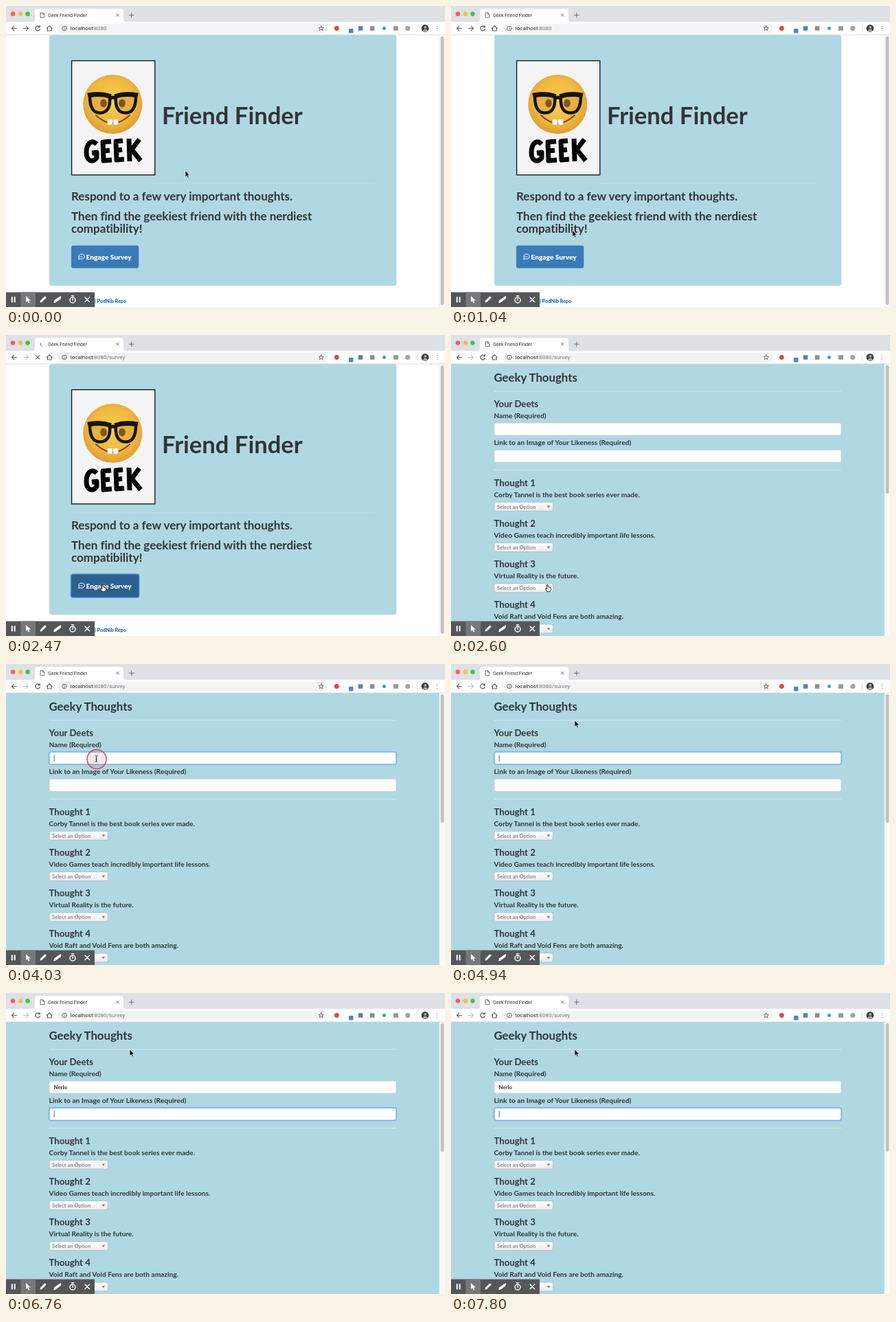
An HTML page that plays this animation: 639x438 px, repeating every 8 s.

```html
<!DOCTYPE html>
<html lang="en">
<head>
<meta charset="utf-8">
<title>Geek Friend Finder</title>
<style>
html, body { margin: 0; width: 100%; height: 100%; overflow: hidden; background: #fff; }
svg { display: block; width: 639px; height: 438px; }
text { font-family: Lato, "Open Sans", sans-serif; font-weight: 700; font-variant-ligatures: none; fill: #333438; white-space: pre; }
.heavy { font-weight: 900; }
.ui { font-family: Roboto, Arial, sans-serif; font-weight: 400; fill: #333; }
.line { fill: none; stroke: #5f6368; stroke-width: 1.2; stroke-linecap: round; stroke-linejoin: round; }
.thin { stroke-width: .9; }
.white { fill: none; stroke: #fff; stroke-width: 1.5; stroke-linecap: round; stroke-linejoin: round; }
.field { fill: #fff; stroke: #c3cdd1; stroke-width: .8; }
.glow rect { fill: none; stroke: #66afe9; }
</style>
</head>
<body>
<svg viewBox="0 0 639 438">
  <defs>
    <radialGradient id="skin" cx=".5" cy=".45" r=".58">
      <stop offset="0" stop-color="#f8cf52"/>
      <stop offset=".65" stop-color="#f0b941"/>
      <stop offset="1" stop-color="#dd9732"/>
    </radialGradient>
    <linearGradient id="soft" x2="0" y2="1">
      <stop offset="0" stop-color="#fff"/>
      <stop offset="1" stop-color="#e9ebec"/>
    </linearGradient>
    <g id="rim">
      <path d="M122 131Q136 128 151 132Q153 155 137 155.500Q122 156 122 131Z" fill="#e0a63c" fill-opacity=".6" stroke="#141414" stroke-width="4.500"/>
      <path d="M119 129.500Q136 125.500 153 131" fill="none" stroke="#141414" stroke-width="5.500"/>
      <ellipse cx="142" cy="141.500" rx="4.800" ry="6" fill="#855222"/>
    </g>
  </defs>

  <g id="home">
    <rect y="42" width="639" height="396" fill="#fff"/>
    <rect x="63" y="42" width="505.300" height="365" rx="4" fill="#b0d8e2"/>
    <rect x="95.600" y="79.600" width="121.200" height="166.200" fill="#f4f4f5" stroke="#111" stroke-width="1.300"/>
    <circle cx="155.300" cy="143" r="43" fill="url(#skin)"/>
    <use href="#rim"/>
    <use href="#rim" transform="translate(311 0) scale(-1 1)"/>
    <path d="M151 135Q155.500 131 160 135" fill="none" stroke="#141414" stroke-width="5"/>
    <path d="M131 159Q155 182 180 159" fill="none" stroke="#7a4817" stroke-width="2" stroke-linecap="round"/>
    <path d="M147.500 165h7.500v6q0 2-2 2h-3q-2.500 0-2.500-3zM156 165h7.500v5q0 3-2.500 3h-3q-2 0-2-2z" fill="#fff" stroke="#c9b79a" stroke-width=".5"/>
    <path role="img" aria-label="GEEK" fill="none" stroke="#050505" stroke-width="7" stroke-linejoin="round"
      d="M132 201C123 192 117 203 117 213C117 225 125 229 132 221V213L125 214M153 197L141 198L142 225L154 224M142 211L151 210M170 196L160 197L161 224L172 223M161 210L169 209M179 193L180 226M194 194L183 209L196 225"/>
    <path d="M95 258.500H536" stroke="#b8dce4"/>
    <text x="227" y="172" font-size="34.600">Friend Finder</text>
    <g font-size="17">
      <text x="95" y="283">Respond to a few very important thoughts.</text>
      <text x="95" y="312">Then find the geekiest friend with the nerdiest</text>
      <text x="95" y="330">compatibility!</text>
    </g>
    <rect id="ring" x="94.700" y="348.200" width="98.800" height="33.600" rx="3" fill="none" stroke="#5590ea" stroke-width="2"/>
    <rect id="button" x="95" y="348.500" width="98.200" height="33" rx="3"/>
    <g fill="none" stroke="#fff">
      <path d="M105.500 368.500L106.300 366.300A4.300 3.600 0 1 1 108.200 367.800Z"/>
      <path d="M106.800 364.800h5" stroke-width="1.200" stroke-dasharray="1.100 .8"/>
    </g>
    <text class="heavy" x="116.500" y="369" font-size="10.100" style="fill:#fff">Engage Survey</text>
    <text class="heavy" x="129" y="431.500" font-size="7.200" style="fill:#2f73b0">| PodNib Repo</text>
  </g>

  <g id="survey">
    <rect y="42" width="639" height="396" fill="#b0d8e2"/>
    <path d="M63 82H568M63 196.500H568" stroke="#d6eaef"/>
    <text x="62.500" y="68" font-size="16.800">Geeky Thoughts</text>
    <text x="62.500" y="105" font-size="13.200">Your Deets</text>
    <g font-size="10.250">
      <text x="62.500" y="121">Name (Required)</text>
      <text x="62.500" y="160">Link to an Image of Your Likeness (Required)</text>
    </g>
    <rect class="field" x="63" y="128" width="505" height="18" rx="2.500"/>
    <rect class="field" x="63" y="167.300" width="505" height="18" rx="2.500"/>
    <g id="focus" class="glow">
      <rect x="62.500" y="127.500" width="506" height="19" rx="3" stroke-width="2.200" opacity=".35"/>
      <rect x="63" y="128" width="505" height="18" rx="2.500" stroke-width="1"/>
    </g>
    <text id="name" x="69.500" y="140" font-size="7.800"></text>
    <path id="caret" d="M.5 132.500v9" stroke="#444" stroke-width=".8"/>
    <g id="thoughts"></g>
  </g>

  <g id="scroll">
    <rect x="631" y="42" width="8" height="396" fill="#fafafa"/>
    <path d="M630.800 42V438" stroke="#e6e6e6" stroke-width=".7"/>
    <rect id="thumb" x="632.700" y="44" width="4.800" rx="2.400" fill="#c1c1c1"/>
  </g>

  <rect width="639" height="23.500" fill="#dee1e6"/>
  <rect y="23" width="639" height="19" fill="#fff"/>
  <path d="M0 42H639" stroke="#d5d7da" stroke-width=".8"/>
  <path d="M38 23.500Q42 23.500 42 19.500V8Q42 4 46 4H167Q171 4 171 8V19.500Q171 23.500 175 23.500Z" fill="#fff"/>
  <circle cx="10" cy="11.500" r="3.200" fill="#fc5b57"/>
  <circle cx="21" cy="11.500" r="3.200" fill="#fdbc40"/>
  <circle cx="31.500" cy="11.500" r="3.200" fill="#34c84a"/>
  <path id="page" class="line thin" d="M50.500 9.800h3.200l2 2v5h-5.200zM53.500 10v2h2"/>
  <circle id="spin" cx="53.500" cy="13.200" r="3" fill="none" stroke="#3b78e7" stroke-dasharray="6 13"/>
  <text class="ui" x="61" y="15.800" font-size="6.850">Geek Friend Finder</text>
  <path class="line thin" d="M160.500 11.500l3.600 3.600m0-3.600l-3.600 3.600M179.500 13.300h6.500m-3.250-3.250v6.500"/>
  <path class="line" d="M15.500 32.500H8.500m3.200-3.200L8.500 32.500l3.200 3.200"/>
  <path id="forward" class="line" d="M25.500 32.500h7m-3.200-3.200l3.200 3.200l-3.200 3.200"/>
  <path id="reload" class="line" d="M48.800 30.300A3.400 3.400 0 1 0 49.400 33.500M49.300 28.700v2.300h-2.400"/>
  <path id="stop" class="line" d="M43.300 29.800l5.400 5.400m0-5.400l-5.400 5.400"/>
  <path class="line" d="M59.300 32.500L63.200 28.900L67.100 32.500M60.400 32v4h5.700v-4"/>
  <rect x="75" y="25.800" width="393" height="13.400" rx="6.700" fill="#f1f3f4"/>
  <circle class="line thin" cx="85" cy="32.500" r="3.300"/>
  <path class="line thin" d="M85 32.200v2M85 30.700v.1"/>
  <text class="ui" x="93.700" y="35.300" font-size="8.050">localhost<tspan id="path" fill="#777"></tspan></text>
  <path class="line thin" d="M458.700 28.900l1.050 2.300l2.500.3l-1.850 1.700l.5 2.500l-2.200-1.250l-2.200 1.250l.5-2.500l-1.850-1.700l2.500-.3z"/>
  <circle cx="481.300" cy="32.500" r="3.400" fill="#dc4a42"/>
  <rect x="499" y="33" width="6.500" height="6.500" rx="1" fill="#4a83dc"/>
  <rect x="512.800" y="29.300" width="6.500" height="6.500" fill="#5b80b5"/>
  <rect x="529.800" y="29.300" width="6.500" height="6.500" fill="#8b8f94"/>
  <circle cx="550.500" cy="32.500" r="2.500" fill="#3f9dc9"/>
  <rect x="564" y="29.300" width="7" height="6.500" fill="#96999d"/>
  <circle cx="584.800" cy="32.500" r="3.500" fill="#a0a3a6"/>
  <path d="M598.500 27v11" stroke="#d5d7da" stroke-width=".8"/>
  <circle cx="610" cy="32.500" r="5.400" fill="#3c3e42"/>
  <circle cx="610.300" cy="31" r="1.900" fill="#a8a8a8"/>
  <path d="M606.500 36.500q3.800-6 7.600 0q-3.800 2.500-7.600 0" fill="#a8a8a8"/>
  <path class="line" d="M627.500 29.500v.01M627.500 32.500v.01M627.500 35.500v.01"/>

  <rect y="416.500" width="129" height="21.500" fill="#555658"/>
  <rect x="21.500" y="416.500" width="21.500" height="21.500" fill="#77787a"/>
  <path class="white" style="stroke-width:2" d="M8.800 424v6.500M12.700 424v6.500"/>
  <path d="M29 422v9l2.200-2l1.600 3.500l1.700-.8l-1.600-3.300h3z" fill="#fff"/>
  <path d="M49.500 431.500l.5-2.700l6-6q1-.8 2 .2t.2 2l-6 6z" fill="#fff"/>
  <path d="M70 428.500l8.500-6h2l-1 3.800l-8 5.700h-2.300z" fill="#fff"/>
  <circle class="white" cx="97" cy="428" r="4"/>
  <path class="white" d="M95.500 421.800h3M97 426v2.200"/>
  <path class="white" d="M115 424l6.500 6.500m0-6.500l-6.500 6.500"/>

  <circle id="click" fill="#d8546a" fill-opacity=".12" stroke="#cf4c63" stroke-width="1.500"/>
  <g id="pointer">
    <path id="arrow" d="M0 0V9.500L2.200 7.500L3.800 11L5.300 10.300L3.800 7H6.700Z" fill="#111" stroke="#fff" stroke-width=".6"/>
    <path id="hand" d="M-.9 0Q0-1 .8 0V3.200Q2 2.700 2.300 3.600Q3.500 3.200 3.800 4.200Q5 4 5 5.300V6.500Q5 8 4 9V9.700H-.8Q-1.500 8-3 6.200Q-3.300 4.700-1.900 5.300L-.9 6.200Z" fill="#fff" stroke="#111" stroke-width=".9"/>
    <path id="beam" d="M-1.800-4.500Q0-4.500 0-3.500Q0-4.500 1.800-4.500M0-3.500V3.500M-1.800 4.500Q0 4.500 0 3.500Q0 4.500 1.800 4.500M-.9.8h1.800" fill="none" stroke="#222"/>
  </g>
</svg>
<script>
const LOOP = 8000, STEP = 130;
const LOAD = 2340, OPEN = 2600, FOCUS = 3900, TAB = 6760;
const NAME = "Nerlo";
const keyTimes = [5200, 5460, 5590, 5720, 5850];
const route = [
  [130, 261, 239.5], [1560, 140.5, 363.5], [2860, 140.5, 363.5],
  [3510, 131.5, 138], [4160, 131.5, 138], [4550, 180, 82]
];
const clicks = [[2080, 141, 366], [3900, 132, 138.5]];
const ringSizes = [9, 14, 14, 5];
const thoughts = [
  "Corby Tannel is the best book series ever made.",
  "Video Games teach incredibly important life lessons.",
  "Virtual Reality is the future.",
  "Void Raft and Void Fens are both amazing."
];

const $ = id => document.getElementById(id);
const show = (id, on) => $(id).style.display = on ? "" : "none";
const set = (id, attrs) => {
  for (const key in attrs) $(id).setAttribute(key, attrs[key]);
};

$("thoughts").innerHTML = thoughts.map((line, i) => `
  <g transform="translate(0 ${i * 59.2})">
    <text x="62.5" y="219.5" font-size="13.2">Thought ${i + 1}</text>
    <text x="62.5" y="235.5" font-size="10.15">${line}</text>
    <rect x="63" y="243.3" width="85.5" height="13" rx="2.5" fill="url(#soft)" stroke="#aab8bd" stroke-width=".8"/>
    <text x="67" y="252.5" font-size="7.6" style="fill:#8b8d90">Select an Option</text>
    <path d="M139.300 248.300h5l-2.500 3.500z" fill="#888"/>
  </g>`).join("");

function pointerAt(t) {
  const next = route.findIndex(p => p[0] > t);
  if (next === 0) return route[0].slice(1);
  if (next < 0) return route[route.length - 1].slice(1);
  const [t0, x0, y0] = route[next - 1], [t1, x1, y1] = route[next];
  const u = (t - t0) / (t1 - t0), k = u * u * (3 - 2 * u);
  return [x0 + (x1 - x0) * k, y0 + (y1 - y0) * k];
}

function drawPointer(t, x, y, hover) {
  const inField = (y > 128 && y < 146) || (y > 167 && y < 185);
  const kind = hover || (t >= OPEN && t < 2990) ? "hand"
    : t >= OPEN && inField ? "beam" : "arrow";
  for (const id of ["arrow", "hand", "beam"]) show(id, id === kind);
  set("pointer", { transform: `translate(${x} ${y})` });

  const hit = clicks.find(c => t >= c[0] && t < c[0] + ringSizes.length * STEP);
  show("click", hit);
  if (!hit) return;
  const r = ringSizes[Math.floor((t - hit[0]) / STEP)];
  set("click", { cx: hit[1], cy: hit[2], r, opacity: r / 14 });
}

function drawForm(t) {
  const typed = keyTimes.filter(k => k <= t);
  $("name").textContent = NAME.slice(0, typed.length);
  const second = t >= TAB;
  const since = second ? TAB : typed.length ? typed[typed.length - 1] : FOCUS;
  const width = second || !typed.length ? 0 : $("name").getComputedTextLength();
  const drop = second ? 39.3 : 0;
  show("focus", t >= FOCUS);
  show("caret", t >= FOCUS && (t - since) % 1000 < 515);
  set("focus", { transform: `translate(0 ${drop})` });
  set("caret", { transform: `translate(${69.7 + width} ${drop})` });
}

function draw(t) {
  const opened = t >= OPEN, loading = t >= LOAD && !opened;
  const [x, y] = pointerAt(t);
  const hover = !opened && x > 95 && x < 193 && y > 349 && y < 381;
  show("home", !opened);
  show("survey", opened);
  show("ring", t >= 2210);
  set("button", { fill: hover ? "#2c608f" : "#3a7ab7" });
  set("thumb", { height: opened ? 187 : 391 });
  show("page", !loading);
  show("spin", loading);
  set("spin", { transform: `rotate(${t * .6 + 60} 53.5 13.2)` });
  show("reload", !loading);
  show("stop", loading);
  $("forward").style.stroke = loading || opened ? "#bfc1c4" : "";
  $("path").textContent = loading || opened ? ":8080/survey" : ":8080";
  if (opened) drawForm(t);
  drawPointer(t, x, y, hover);
}

const start = performance.now();
function tick() {
  const t = (performance.now() - start) % LOOP;
  draw(Math.floor(t / STEP) * STEP);
  requestAnimationFrame(tick);
}
tick();
</script>
</body>
</html>
```
